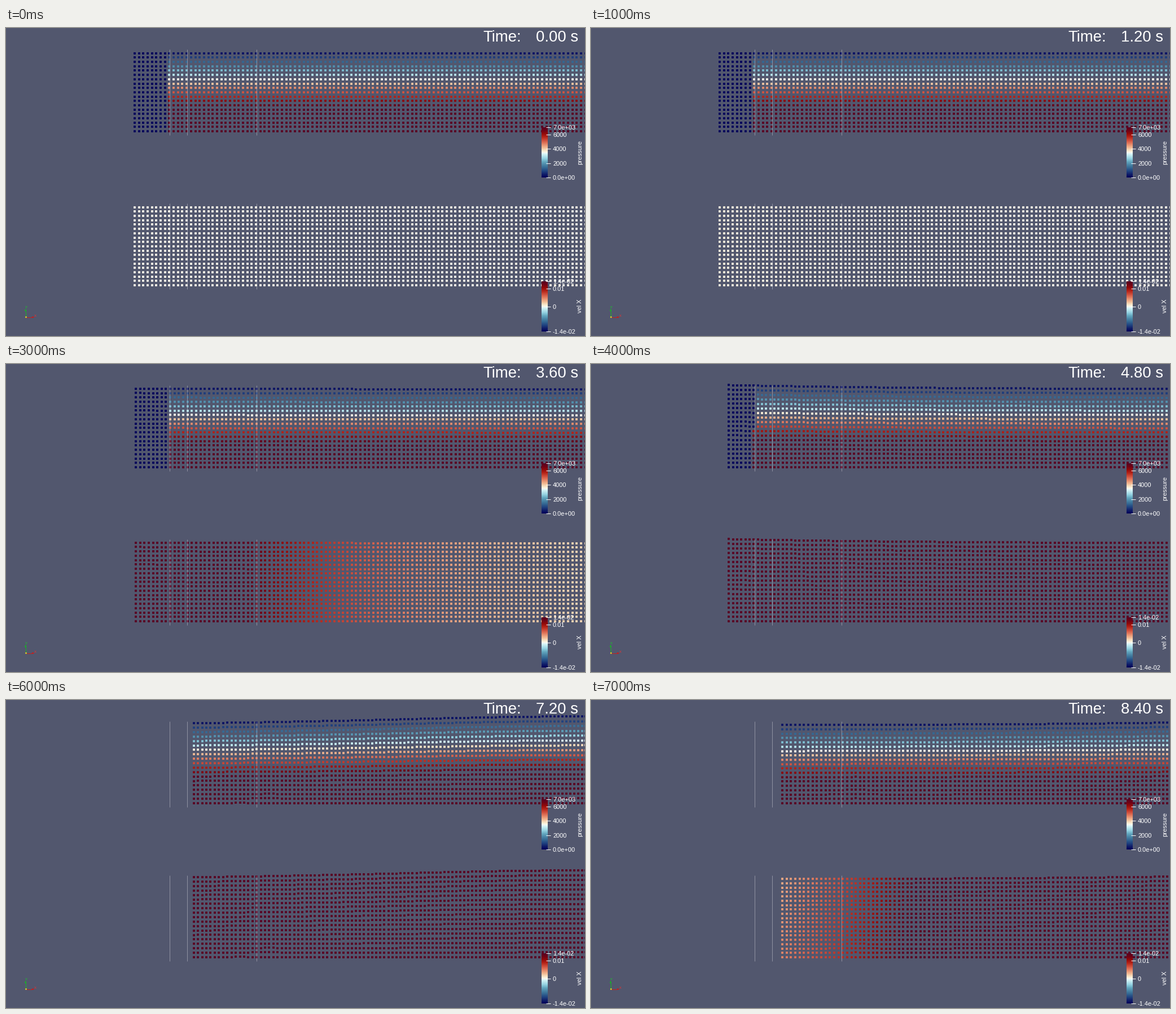
Write a matplotlib script that moves like this. It is 1026 px wide and 546 px high and loops after 8000 ms.

```python
import numpy as np
import matplotlib.pyplot as plt
from matplotlib.animation import FuncAnimation
from matplotlib.colors import LinearSegmentedColormap

W, H, DPI = 1026, 546, 100
PX = 72 / DPI                      # points per pixel
FONT = "Liberation Sans"
STEP = 1.2                         # simulated seconds per picture

# particle grid, in pixels
GAP, COLS, ROWS = 7.68, 107, 19
LEFT, FLOOR = 228, 183
GATE = 288.4                       # no pressure left of this line
PANEL = 273                        # offset of the lower panel

# solitary wave: half stroke, speed, time scale, arrival at the left edge
STROKE, SPEED, TAU, ARRIVE = 56, 507, 1.09, 5.76
V_PEAK, V_MAX, P_MAX = 0.365, 0.014, 7000
P_ROW = 540                        # hydrostatic pressure per row

COLORS = [
    (0.0, "#000059"), (0.0625, "#101e69"), (0.125, "#204380"),
    (0.1875, "#336591"), (0.25, "#4985a6"), (0.3125, "#63a7bf"),
    (0.375, "#92d1e0"), (0.4375, "#c0eaf0"), (0.48, "#e4f8fa"),
    (0.5, "#fcf8ec"), (0.52, "#fcf1d9"), (0.54, "#fae5c8"),
    (0.5625, "#f7d5b2"), (0.594, "#f2bb96"), (0.625, "#eda682"),
    (0.6875, "#e0755a"), (0.75, "#cc4938"), (0.8125, "#b32117"),
    (0.875, "#930a0a"), (0.9375, "#6f0316"), (1.0, "#590021"),
]
cmap = LinearSegmentedColormap.from_list("coolwarm_ext", COLORS, 512)

rng = np.random.default_rng(4)
row = np.arange(ROWS)[:, None]
depth = row / (ROWS - 1)
s = GAP * np.arange(COLS)[None, :]
speckle = rng.normal(0, 0.00012, (ROWS, COLS)) * (s / s.max())


def wave(t):
    """Positions, pressure and horizontal velocity of all particles."""
    u = (t - ARRIVE - s / SPEED) / TAU
    pulse = 1 / np.cosh(u) ** 2
    x = LEFT + s + STROKE * (1 + np.tanh(u)) + 0 * row
    k = STROKE / (SPEED * TAU) * pulse
    rise = k / (1 - k)
    y = FLOOR - (ROWS - 1 - row) * GAP * (1 + rise)

    # the floor lifts a little behind the crest, near the third marker
    passed = np.clip((t - 4.8) / 1.2, 0, 1)
    low = depth ** 4
    y = y - passed * low * pulse * 1.6 / (1 + np.exp((x - 443) / 6))
    y = y - passed * low * (row < ROWS - 1) * np.exp(-((x - 468) / 28) ** 2)

    p = P_ROW * (row * (1 + rise) + 0.5)
    p = np.where(x + 4 * rise * (row - 9) < GATE, 0, p)

    v = V_PEAK * pulse + 0 * row
    tail = 0.7 * v - 0.0039 + 0.0014 * (depth - 0.5)
    v = np.where(u > 1, tail, v) + speckle * np.exp(-t)
    return x, y, p, v


fig = plt.figure(figsize=(W / DPI, H / DPI), dpi=DPI, facecolor="#52576e")
ax = fig.add_axes([0, 0, 1, 1])
ax.axis("off")


def label(x, y, text, size=11, color="white", **kw):
    kw = {"va": "center_baseline", "ha": "left", **kw}
    return ax.text(x, y, text, fontsize=size * PX, color=color,
                   family=FONT, zorder=6, **kw)


def line(xs, ys, color="white", width=1, **kw):
    ax.plot(xs, ys, color=color, lw=width * PX, solid_capstyle="butt", **kw)


def dots(low, high):
    zeros = np.zeros(ROWS * COLS)
    return ax.scatter(zeros, zeros, c=zeros, s=(3.8 * PX) ** 2, marker="s",
                      linewidths=0, cmap=cmap, vmin=low, vmax=high,
                      snap=False, zorder=2)


def color_bar(top, title, low, high, ticks):
    height = 89
    ax.imshow(np.linspace(1, 0, 256)[:, None], cmap=cmap, aspect="auto",
              extent=(949, 960, top + height, top), zorder=4)
    for value, text in ticks:
        y = top + height * (high - value) / (high - low)
        line([957, 965], [y, y], zorder=5)
        label(969, y, text)
    label(1017, top + 44, title, rotation=90, ha="center", va="center")


pressure = dots(0, P_MAX)
velocity = dots(-V_MAX, V_MAX)

for x in (289.5, 320.5, 443.5):
    for top in (38, 38 + PANEL):
        line([x, x], [top, top + 152], "#e4e4ea", alpha=0.42, zorder=3)

color_bar(176, "pressure", 0, P_MAX,
          [(7000, "7.0e+03"), (6000, "6000"), (4000, "4000"),
           (2000, "2000"), (0, "0.0e+00")])
color_bar(449, "vel X", -V_MAX, V_MAX,
          [(V_MAX, "1.4e-02"), (0.01, "0.01"), (0, "0"),
           (-V_MAX, "-1.4e-02")])

# orientation axes
line([34.5, 34.5], [511, 499], "#18b028")
line([36, 48], [512.5, 512.5], "#c02020")
ax.fill([33, 36, 34.5], [502, 502, 497], color="#18b028", lw=0)
ax.fill([46, 46, 51], [511, 514, 512.5], color="#c02020", lw=0)
ax.scatter([34.5], [512], s=(3 * PX) ** 2, color="#d0c030", lw=0, zorder=4)
label(35.5, 495, "Y", 6, "#10d820", ha="center")
label(52, 510, "X", 6, "#f03030", ha="center")

label(845, 23.5, "Time:", 27.5, va="baseline")
clock = label(1014, 23.5, "", 27.5, va="baseline", ha="right")

ax.set_xlim(0, W)
ax.set_ylim(H, 0)


def update(i):
    t = i * STEP
    x, y, p, v = wave(t)
    x, y = np.round(x).ravel(), np.round(y).ravel()
    pressure.set_offsets(np.c_[x, y])
    pressure.set_array(p.ravel())
    velocity.set_offsets(np.c_[x, y + PANEL])
    velocity.set_array(v.ravel())
    clock.set_text(f"{t:.2f} s")
    return pressure, velocity, clock


anim = FuncAnimation(fig, update, frames=8, interval=1000, repeat=True,
                     repeat_delay=0, blit=False)
plt.show()
```
